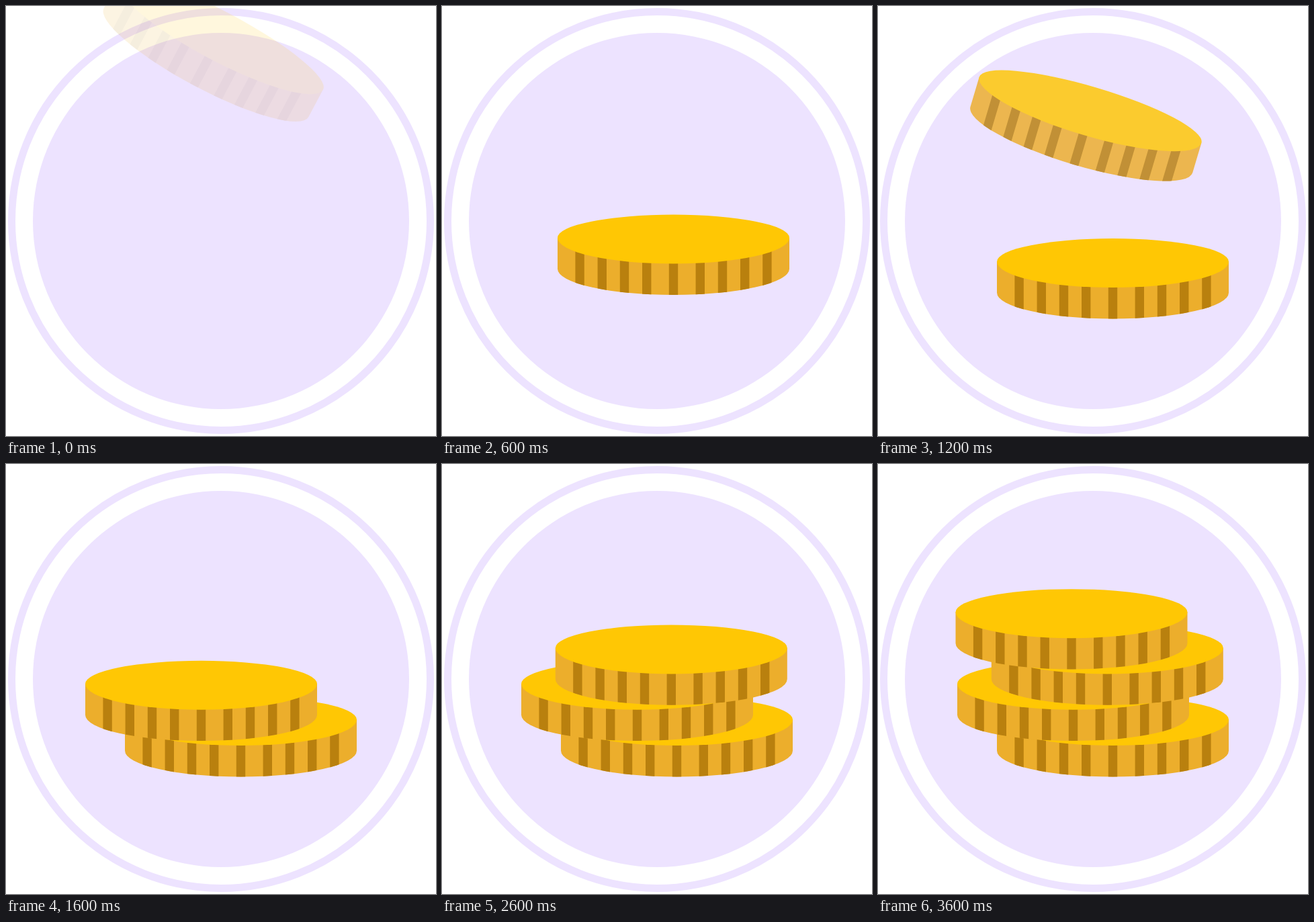
An HTML page that plays this animation: 640 px wide and 640 px high, repeating every 4.8 s.

```html
<!DOCTYPE html>
<html lang="en">
<head>
<meta charset="utf-8">
<title>Coin stack</title>
<style>
  html, body { margin: 0; height: 100%; overflow: hidden; background: #fff; }
  svg { display: block; width: 100%; height: 100%; }
</style>
</head>
<body>
<svg viewBox="0 0 640 640">
  <defs>
    <path id="side" d="M-172.5 0V46.3A172.5 38.7 0 0 0 172.5 46.3V0Z"/>
    <clipPath id="rim"><use href="#side"/></clipPath>
    <g id="coin">
      <use href="#side" fill="#ecae2c"/>
      <g id="ridges" clip-path="url(#rim)" fill="#b9800e"></g>
      <path fill="#ffc704" d="M-172.5 0A172.5 34.3 0 0 1 172.5 0A172.5 38.7 0 0 1 -172.5 0Z"/>
    </g>
  </defs>
  <circle cx="320" cy="320" r="311.5" fill="none" stroke="#ede3ff" stroke-width="11"/>
  <circle cx="320" cy="320" r="280" fill="#ede3ff"/>
  <g id="stack"></g>
</svg>
<script>
const LOOP = 4800, STEP = 100, GAP = 1000;
const BASE = 380.4, THICK = 53.3;

// x: resting place; dx, rise, tilt: pose above it at the start; fall: duration in ms
// slide, sink: last shift after landing
const coins = [
  { x: 349.5, dx: -24.8, rise: 301.6, tilt: 28, fall: 600, slide: 5, sink: 35.5 },
  { x: 290.5, dx: 38.8, rise: 262, tilt: 25.1, fall: 585 },
  { x: 341.3, dx: -3.5, rise: 247, tilt: 37.5, fall: 530 },
  { x: 288, dx: 38.8, rise: 170, tilt: 25.1, fall: 585 }
];

function add(parent, tag, attrs) {
  const el = document.createElementNS("http://www.w3.org/2000/svg", tag);
  for (const name in attrs) el.setAttribute(name, attrs[name]);
  return document.getElementById(parent).appendChild(el);
}

const clamp = v => Math.min(1, Math.max(0, v));

for (let i = -4; i <= 4; i++) {
  const x = i * 33.2 + Math.sign(i) * 6.6;
  add("ridges", "rect", { x: x - 6.7, width: 13.4, height: 90 });
}
const views = coins.map(() => add("stack", "use", { href: "#coin" }));

function draw(now) {
  const t = Math.floor(now % LOOP / STEP) * STEP;
  coins.forEach(({ x, dx, rise, tilt, fall, slide = 0, sink = 0 }, i) => {
    const age = t - i * GAP;
    const left = 1 - clamp(age / fall);
    const unsettled = 1 - clamp((age - fall) / 200);
    const px = x + dx * left - slide * unsettled;
    const py = BASE - i * THICK - rise * left - sink * unsettled;
    views[i].setAttribute("transform", `translate(${px} ${py}) rotate(${tilt * left})`);
    views[i].setAttribute("opacity", age < 0 ? 0 : clamp(0.13 + age * 0.0035));
  });
}

let start;
function tick(now) {
  start ??= now;
  draw(now - start);
  requestAnimationFrame(tick);
}
draw(0);
requestAnimationFrame(tick);
</script>
</body>
</html>
```
